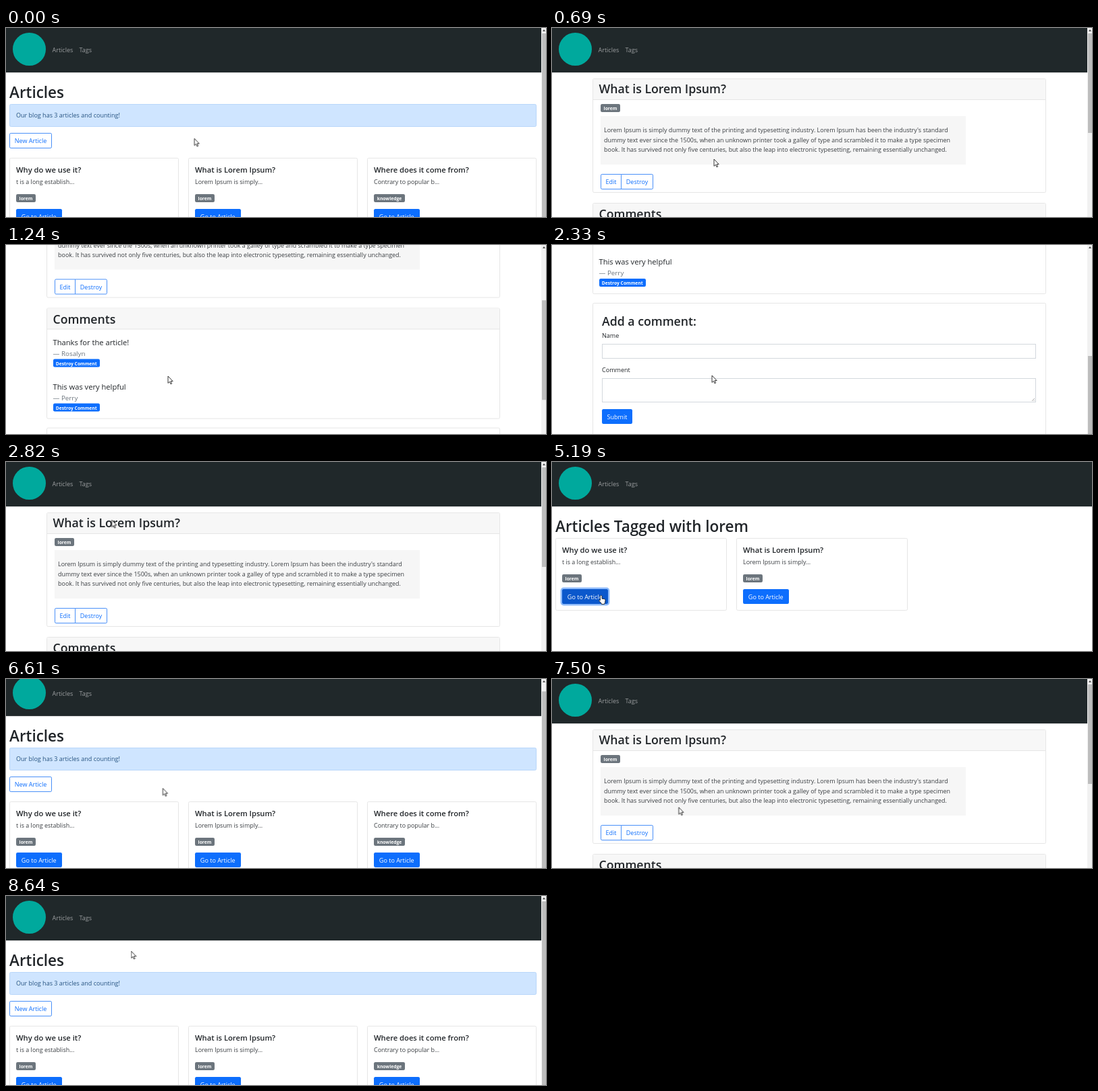
An HTML page that plays this animation: 800 px wide and 281 px high, repeating every 8710 ms.

```html
<!DOCTYPE html>
<html lang="en">
<head>
<meta charset="utf-8">
<title>Blog</title>
<style>
@property --s { syntax: "<number>"; inherits: true; initial-value: 0; }
html, body { margin: 0; width: 100%; height: 100%; overflow: hidden; background: #fff; }
#stage {
  position: relative; width: 800px; height: 281px; overflow: hidden;
  font: 9.03px "Open Sans", "Noto Sans", sans-serif; color: #212529;
  animation: scroll 8.71s linear infinite;
}
#stage div { position: absolute; box-sizing: border-box; white-space: nowrap; }
#stage .scene { inset: 0; overflow: hidden; background: #fff; animation: 8.71s step-end infinite; }
#stage .page { inset: 0; transform: translateY(calc(var(--s) * -1px)); }

/* Text is placed by the middle of its line */
.t { line-height: 0; }
.h1 { font-size: 22.5px; font-weight: 600; }
.h2 { font-size: 17.7px; font-weight: 600; }
.h5 { font-size: 11.2px; font-weight: 600; }
.quote { font-size: 11.15px; }
.by { font-size: 9.85px; color: #6c757d; }
.nav { color: #9b9ea0; }
.info { color: #25527f; }
.body { font-size: 8.95px; color: #3a3e42; }
.white { color: #fff; }
.bold { font-weight: 700; }

.bar { background: #20282a; box-shadow: 0 1px 1px rgba(0, 0, 0, .12); }
.logo { background: #00a99d; border-radius: 50%; }
.alert { background: #cfe5ff; border: 1px solid #b9d7fa; border-radius: 2.4px; }
.card { border: 1px solid #e6e6e6; border-radius: 2.4px; }
.head { background: #f7f7f7; border-bottom: 1px solid #e6e6e6; }
.well { background: #f6f6f6; }
.field { border: 1px solid #d3d8dd; }
.dark { background: #20282a; }
.rule { background: #e4e4da; }
.thin { background: #30383a; }
.btn, .badge { display: flex; align-items: center; justify-content: center; color: #fff; border-radius: 2.2px; }
.btn { background: #0d6efd; }
.line { background: #fff; color: #0d6efd; border: 1px solid #4a90f8; }
.left { border-radius: 2.2px 0 0 2.2px; }
.right { border-radius: 0 2.2px 2.2px 0; }
.badge { background: #6c757d; font-size: 6.75px; font-weight: 700; }
.red { background: #dc3545; }
.blue { background: #0d6efd; }
.pressed { animation: press 8.71s step-end infinite; }

.track { background: #f1f1f1; }
.track::before { content: ""; position: absolute; left: 1.5px; top: 2px; border: 2px solid transparent; border-top: 0; border-bottom: 3px solid #505050; }
.thumb { background: #bdbdbd; transform: translateY(calc(var(--s) * var(--k) * 1px)); }

#stage .cursor { left: 0; top: 0; animation: move 8.71s linear infinite; }
.cursor svg { position: absolute; left: 0; top: 0; overflow: visible; fill: #fff; stroke: #222; stroke-width: .9; stroke-linejoin: round; }
.arrow { animation: arrow 8.71s step-end infinite; }
.hand { animation: hand 8.71s step-end infinite; }

#stage .articles { animation-name: articles; }
#stage .lorem { animation-name: lorem; }
#stage .tags { animation-name: tags; }
#stage .tagged { animation-name: tagged; }
#stage .why { animation-name: why; }

@keyframes articles {
  0% { visibility: visible } 5.511% { visibility: hidden } 69.69% { visibility: visible }
  80.712% { visibility: hidden } 96.211%, 100% { visibility: visible }
}
@keyframes lorem {
  0% { visibility: hidden } 5.511% { visibility: visible } 37.199% { visibility: hidden }
  80.712% { visibility: visible } 96.211%, 100% { visibility: hidden }
}
@keyframes tags {
  0% { visibility: hidden } 37.199% { visibility: visible } 49.483%, 100% { visibility: hidden }
}
@keyframes tagged {
  0% { visibility: hidden } 49.483% { visibility: visible } 62.687%, 100% { visibility: hidden }
}
@keyframes why {
  0% { visibility: hidden } 62.687% { visibility: visible } 69.69%, 100% { visibility: hidden }
}
@keyframes scroll {
  0%, 1.607% { --s: 0 }
  4.018%, 5.51% { --s: 11 }
  5.511%, 11.022% { --s: 0 }
  14.237% { --s: 166; animation-timing-function: ease-out }
  21.355% { --s: 352 }
  27.555% { --s: 352; animation-timing-function: ease-in-out }
  31.573%, 73.479% { --s: 0 }
  75.89%, 80.711% { --s: 11 }
  80.712%, 100% { --s: 0 }
}
@keyframes press {
  0% { background: #0d6efd; box-shadow: none }
  57.979% { background: #0b5ed7; box-shadow: none }
  59.587% { background: #0b58cc; box-shadow: 0 0 0 2.4px #8fbcfb }
  62.687%, 100% { background: #0d6efd; box-shadow: none }
}
@keyframes move {
  0% { transform: translate(279px, 164px) }
  4.018%, 5.511% { transform: translate(312px, 270px) }
  7.922%, 25.144% { transform: translate(240px, 195px) }
  26.751%, 29.162% { transform: translate(237px, 194px) }
  33.984%, 37.199% { transform: translate(117px, 33px) }
  40.184% { transform: translate(83px, 137px) }
  44.891%, 53.961% { transform: translate(56px, 149px) }
  58.783%, 62.687% { transform: translate(71px, 198px) }
  67.394%, 69.69% { transform: translate(84px, 33px) }
  75.89% { transform: translate(232px, 162px) }
  78.301%, 80.712% { transform: translate(310px, 262px) }
  89.208% { transform: translate(118px, 150px) }
  93.111%, 96.211% { transform: translate(36px, 30px) }
  99.196%, 100% { transform: translate(185.5px, 82px) }
}
@keyframes arrow {
  0% { opacity: 1 } 4.018% { opacity: 0 } 5.511% { opacity: 1 }
  33.5% { opacity: 0 } 37.5% { opacity: 1 } 43.8% { opacity: 0 } 49.483% { opacity: 1 }
  57.979% { opacity: 0 } 62.687% { opacity: 1 } 67% { opacity: 0 } 70% { opacity: 1 }
  78.1% { opacity: 0 } 80.712% { opacity: 1 } 92.4% { opacity: 0 } 96.5%, 100% { opacity: 1 }
}
@keyframes hand {
  0% { opacity: 0 } 4.018% { opacity: 1 } 5.511% { opacity: 0 }
  33.5% { opacity: 1 } 37.5% { opacity: 0 } 43.8% { opacity: 1 } 49.483% { opacity: 0 }
  57.979% { opacity: 1 } 62.687% { opacity: 0 } 67% { opacity: 1 } 70% { opacity: 0 }
  78.1% { opacity: 1 } 80.712% { opacity: 0 } 92.4% { opacity: 1 } 96.5%, 100% { opacity: 0 }
}
</style>
</head>
<body>
<div id="stage"></div>
<script>
const text = (x, y, str, cls = "") =>
  `<div class="t ${cls}" style="left:${x}px;top:${y}px">${str}</div>`;
const box = (x, y, w, h, cls, inner = "", css = "") =>
  `<div class="${cls}" style="left:${x}px;top:${y}px;width:${w}px;height:${h}px;${css}">${inner}</div>`;
const badge = (x, y, w, str, cls = "") => box(x, y, w, 12, "badge " + cls, str);
const heading = str => text(5, 95.5, str, "h1");

const header = box(0, 0, 800, 66, "bar") + box(10, 7, 49, 49, "logo") +
  text(68.5, 33, "Articles", "nav") + text(108.5, 33, "Tags", "nav");

const scrollbar = (size, ratio) =>
  box(793, 0, 7, 281, "track", box(1, 8, 6, size, "thumb", "", `--k:${ratio}`));

const scene = (name, content, bar = "") =>
  `<div class="scene ${name}"><div class="page">${header}${content}</div>${bar}</div>`;

const posts = [
  ["Why do we use it?", "t is a long establish...", "lorem", 29],
  ["What is Lorem Ipsum?", "Lorem Ipsum is simply...", "lorem", 29],
  ["Where does it come from?", "Contrary to popular b...", "knowledge", 46],
];

const card = ([title, lead, tag, tagWidth], x, y, w, btn = "") =>
  box(x, y, w, 108, "card") +
  text(x + 10, y + 17.6, title, "h5") +
  text(x + 10, y + 36.4, lead, "body") +
  badge(x + 10, y + 54, tagWidth, tag) +
  box(x + 10, y + 76, 67.5, 22, "btn " + btn, "Go to Article");

const articles = heading("Articles") +
  box(5, 113, 781, 34, "alert") +
  text(15, 130.2, "Our blog has 3 articles and counting!", "info") +
  box(5, 156, 63, 23, "btn line", "New Article") +
  posts.map((p, i) => card(p, 5 + 265 * i, 193, 251)).join("");

const tagged = heading("Articles Tagged with lorem") +
  card(posts[0], 5, 113, 254, "pressed") + card(posts[1], 273, 113, 254);

const tagRow = (i, tag, w, count) => {
  const y = 149.3 + 24.2 * i;
  return text(10, y, i, "white bold") + badge(43, y - 6, w, tag) +
    badge(45.5 + w, y - 6, 31, "Delete", "red") + text(314, y, count, "white");
};

const tags = heading("Tags") + box(5, 113, 395, 72, "dark") +
  box(5, 136, 395, 1, "rule") + box(5, 161, 395, 1, "thin") +
  text(10, 124.8, "#", "white bold") + text(43, 124.8, "Tag", "white bold") +
  text(237, 124.8, "Tagged articles", "white bold") +
  tagRow(0, "lorem", 28.5, 2) + tagRow(1, "knowledge", 46, 1);

const comment = (y, words, name) => text(69.5, y, words, "quote") +
  text(69.5, y + 16, "— " + name, "by") + badge(69.5, y + 25, 69.5, "Destroy Comment", "blue");

const grip = `<svg width="6" height="6" style="position:absolute;right:0;bottom:0" stroke="#888" stroke-width=".7"><path d="M1 5 5 1M3.5 5 5 3.5"/></svg>`;

const article = (title, lines) =>
  box(60, 75, 672, 170, "card") + box(61, 76, 670, 31, "head") + text(69.5, 90, title, "h2") +
  badge(72, 113, 29, "lorem") + box(72, 131, 541, 72, "well") +
  lines.map((l, i) => text(77, 152.4 + 14.4 * i, l, "body")).join("") +
  box(72, 217, 31, 23, "btn line left", "Edit") +
  box(102, 217, 48, 23, "btn line right", "Destroy") +
  box(60, 260, 672, 165, "card") + box(61, 261, 670, 31, "head") + text(69.5, 275.5, "Comments", "h2") +
  comment(311, "Thanks for the article!", "Rosalyn") +
  comment(377, "This was very helpful", "Perry") +
  box(60, 438, 672, 215, "card") + text(74, 464.5, "Add a comment:", "h2") +
  text(74, 487.3, "Name") + box(74, 499, 643, 22, "field") +
  text(74, 538, "Comment") + box(74, 550, 643, 36, "field", grip) +
  box(74, 596, 45, 22, "btn", "Submit");

const lorem = article("What is Lorem Ipsum?", [
  "Lorem Ipsum is simply dummy text of the printing and typesetting industry. Lorem Ipsum has been the industry's standard",
  "dummy text ever since the 1500s, when an unknown printer took a galley of type and scrambled it to make a type specimen",
  "book. It has survived not only five centuries, but also the leap into electronic typesetting, remaining essentially unchanged.",
]);
const why = article("Why do we use it?", [
  "t is a long established fact that a reader will be distracted by the readable content of a page when looking at its",
  "layout. The point of using Lorem Ipsum is that it has a more-or-less normal distribution of letters, as opposed to using",
  "'Content here, content here', making it look like readable English.",
]);

const cursor = `<div class="cursor">
  <svg class="arrow" width="8" height="13"><path d="M0 0V10.4L2.4 8.2 4 11.8 5.6 11.1 4 7.6H7.2Z"/></svg>
  <svg class="hand" width="10" height="15"><path d="M1.6.5C2.6.5 3 1 3 1.8V5.2L6.4 5.7C7.7 6 8.1 6.7 8 7.8L7.6 10.6 6.6 13.4H2.4L1.8 11.6-1.2 8.5C-1.6 7.4-.4 6.9.4 7.7V1.8C.4 1 .8.5 1.6.5Z"/></svg>
</div>`;

document.getElementById("stage").innerHTML =
  scene("articles", articles, scrollbar(300, 0.95)) +
  scene("lorem", lorem, scrollbar(148, 0.446)) +
  scene("tags", tags) +
  scene("tagged", tagged) +
  scene("why", why, scrollbar(148, 0.446)) +
  cursor;
</script>
</body>
</html>
```
